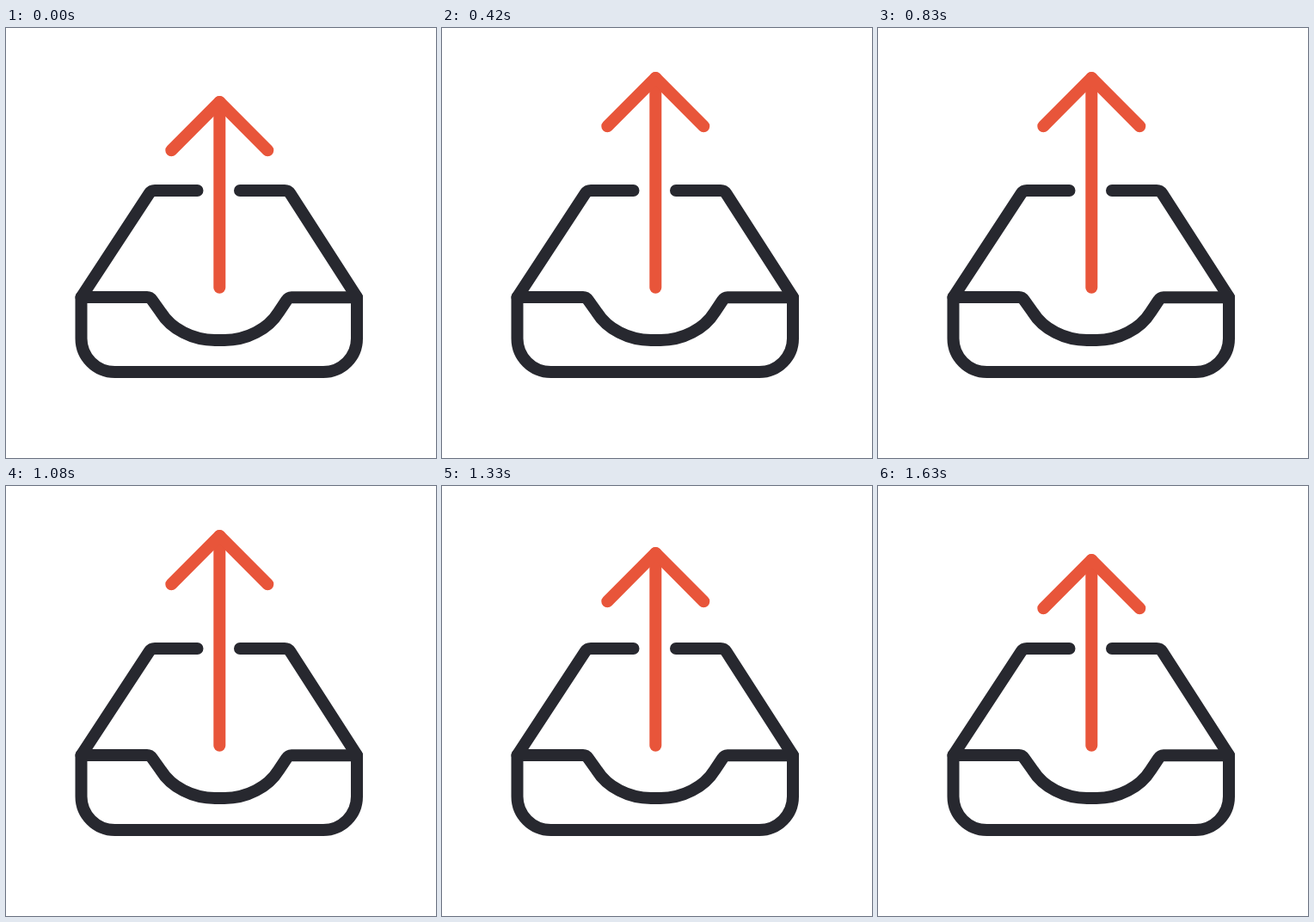
An HTML page that plays this animation: 500x500 px, repeating every 1680 ms.

```html
<!DOCTYPE html>
<html lang="en">
<head>
<meta charset="utf-8">
<title>Outbox</title>
<style>
  html, body { margin: 0; width: 100%; height: 100%; overflow: hidden; background: #fff; }
  svg { display: block; width: 100vw; height: 100vh; }
  path { fill: none; stroke-width: 14; stroke-linecap: round; stroke-linejoin: round; }
  .tray path { stroke: #27282f; }
  .arrow path { stroke: #e8553a; }
</style>
</head>
<body>
<svg viewBox="0 0 500 500">
  <g class="tray">
    <path d="M222.500 189H173Q169 189 166.500 192.500L87.500 313"/>
    <path d="M272 189H324Q328 189 330.500 192.500L408 313"/>
    <path d="M87.500 313H164Q167.500 313 170 316.500L180 330.500C192 350 217 363 243 363H254C280 363 305 350 317 330.500L326 317Q328.500 313.300 332 313.300H408V361A39 39 0 0 1 369 400H126.500A39 39 0 0 1 87.500 361Z"/>
  </g>
  <g class="arrow">
    <path id="shaft"/>
    <path id="head" d="M192.300 56.300L248.300 0L304.300 56.300"/>
  </g>
</svg>
<script>
  const LOOP = 1680, FPS = 24, LAST = 39;

  // [step, y of the arrow tip]
  const KEYS = [
    [0, 86], [1.5, 95], [5.5, 50], [10, 58], [17.4, 75],
    [21.6, 50], [26, 58], [29.5, 50], [33.83, 95], [39, 86]
  ];

  const shaft = document.getElementById('shaft');
  const head = document.getElementById('head');

  const ease = p => (1 - Math.cos(Math.PI * p)) / 2;

  function tipAt(step) {
    const i = Math.max(1, KEYS.findIndex(k => k[0] >= step));
    const [t0, y0] = KEYS[i - 1], [t1, y1] = KEYS[i];
    return y0 + (y1 - y0) * ease((step - t0) / (t1 - t0));
  }

  function draw(ms) {
    const step = Math.min(LAST, Math.floor((ms % LOOP + 4.9) * FPS / 1000));
    const y = tipAt(step);
    head.setAttribute('transform', `translate(0 ${y})`);
    shaft.setAttribute('d', `M248.300 ${y}V301.700`);
  }

  const start = performance.now();
  function tick() {
    draw(performance.now() - start);
    requestAnimationFrame(tick);
  }
  tick();
</script>
</body>
</html>
```
